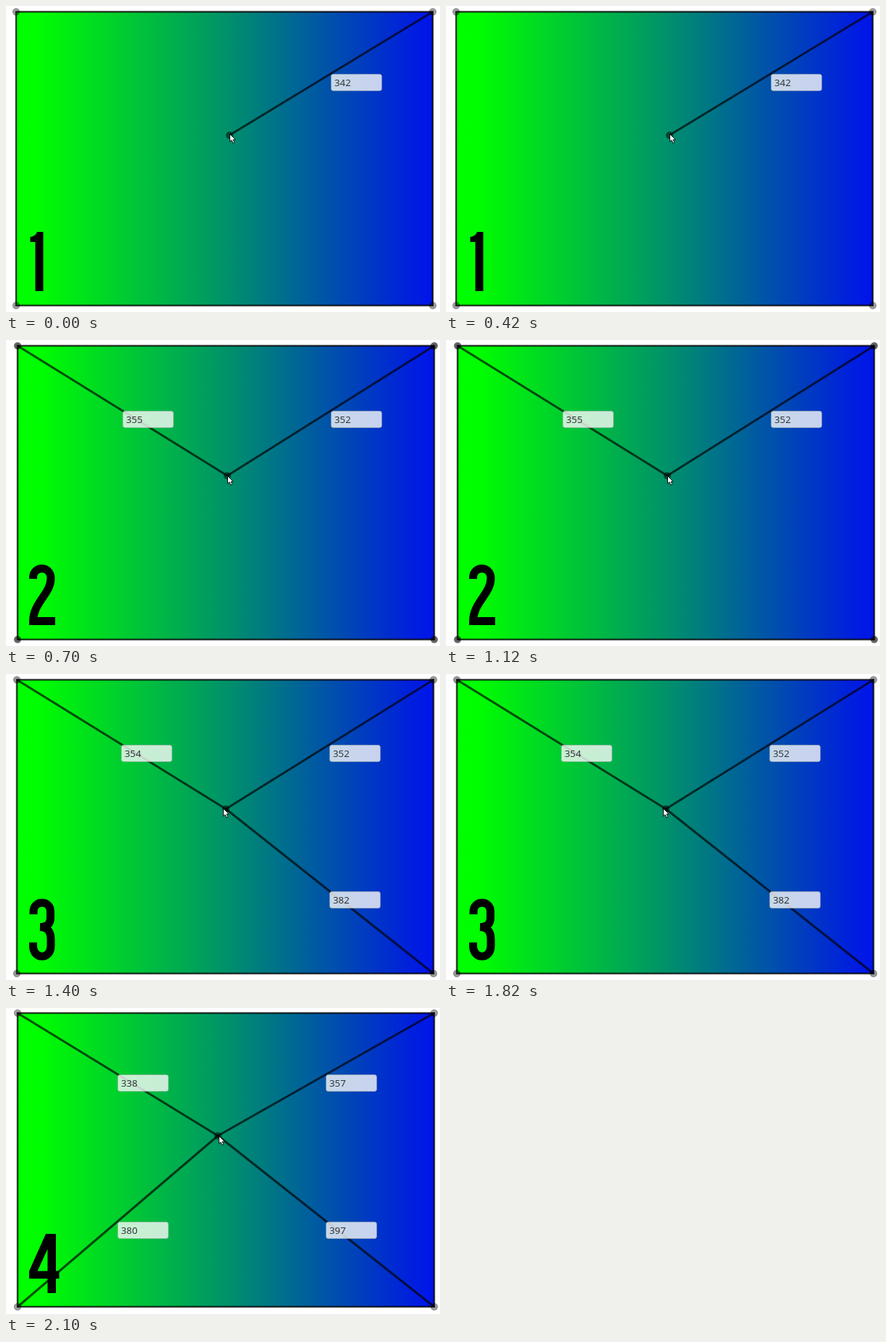
An HTML page with a canvas for the animation above (2.8 s loop, 600 by 424 pixels).

```html
<!DOCTYPE html>
<html lang="en">
<head>
<meta charset="utf-8">
<title>Spokes from a point to the corners</title>
<style>
  html, body { margin: 0; width: 100%; height: 100%; overflow: hidden; background: #fff; }
  canvas { display: block; width: 600px; height: 424px; }
</style>
</head>
<body>
<canvas id="stage" width="600" height="424"></canvas>
<script>
const ctx = document.getElementById('stage').getContext('2d');
const STEP = 700;
const WIDTH = 576, HEIGHT = 407;

// Spokes are ordered: top right, top left, bottom right, bottom left.
const scenes = [
  { origin: [14, 8], hub: [309, 179], tip: [309, 177], lengths: [342], node: 0.36 },
  { origin: [16, 8], hub: [306, 188], tip: [306, 188], lengths: [352, 355], node: 0.6 },
  { origin: [15, 8], hub: [304, 187], tip: [300, 186], lengths: [352, 354, 382], node: 0.38 },
  { origin: [16, 7], hub: [293, 177], tip: [294, 177], lengths: [357, 338, 397, 380], node: 0.36 }
];

const numerals = [
  { fill: 'M43 313H51.5V395H40.5V327H33.5V320Q41 319 43 313Z' },
  { stroke: 'M37.5 331V329C37.5 312.5 62 312.5 62 330C62 352 37.5 364 37.5 389.5H68' },
  { stroke: 'M38 333V329C38 313 61.5 313 61.5 329V338Q61.5 350.5 47 350.5M47 350.5Q62 351 62 367V377C62 396 37.5 396 37.5 377V372' },
  { fill: 'M55 313H69V364.5H73.5V375H69V395H57.5V375H32V364.5ZM57.5 334L43.5 364.5H57.5Z' }
].map(({ fill, stroke }) => ({ path: new Path2D(fill || stroke), filled: !!fill }));

const pointer = new Path2D('M0.5 0.5V11L3 8.8L4.8 13L6.8 12.1L5 8.1H8.3Z');

const shade = alpha => `rgba(0,0,0,${alpha})`;

function line(from, to) {
  ctx.beginPath();
  ctx.moveTo(...from);
  ctx.lineTo(...to);
  ctx.strokeStyle = shade(0.68);
  ctx.lineWidth = 3;
  ctx.stroke();
}

function dot([x, y], alpha) {
  ctx.beginPath();
  ctx.arc(x, y, 4.6, 0, Math.PI * 2);
  ctx.fillStyle = shade(alpha);
  ctx.fill();
  ctx.strokeStyle = shade(0.3);
  ctx.lineWidth = 1.3;
  ctx.stroke();
}

function label(text, x, y) {
  ctx.beginPath();
  ctx.roundRect(x + 0.5, y + 0.5, 70, 23, 3);
  ctx.fillStyle = 'rgba(250,250,250,0.8)';
  ctx.fill();
  ctx.strokeStyle = 'rgba(150,160,160,0.55)';
  ctx.lineWidth = 1;
  ctx.stroke();
  ctx.fillStyle = '#30383a';
  ctx.font = '13.33px "Noto Sans", "Open Sans", sans-serif';
  ctx.fillText(text, x + 5, y + 17);
}

function drawPlane([x, y]) {
  const gradient = ctx.createLinearGradient(x, 0, x + WIDTH, 0);
  gradient.addColorStop(0, 'rgb(0,255,0)');
  gradient.addColorStop(0.05, 'rgb(0,254,0)');
  gradient.addColorStop(0.5, 'rgb(0,146,105)');
  gradient.addColorStop(0.95, 'rgb(0,30,222)');
  gradient.addColorStop(1, 'rgb(0,20,235)');
  ctx.fillStyle = gradient;
  ctx.fillRect(x, y, WIDTH, HEIGHT);
  ctx.strokeStyle = shade(0.75);
  ctx.lineWidth = 2.5;
  ctx.strokeRect(x, y, WIDTH, HEIGHT);
}

function drawNumeral({ path, filled }) {
  ctx.fillStyle = ctx.strokeStyle = '#000';
  ctx.lineWidth = 11;
  if (filled) ctx.fill(path, 'evenodd');
  else ctx.stroke(path);
}

function drawPointer([x, y]) {
  ctx.save();
  ctx.translate(x, y);
  ctx.fillStyle = '#fff';
  ctx.strokeStyle = '#111';
  ctx.lineWidth = 1;
  ctx.fill(pointer);
  ctx.stroke(pointer);
  ctx.restore();
}

function draw(index) {
  const { origin, hub, tip, lengths, node } = scenes[index];
  const [left, top] = origin;
  const corners = [
    [left + WIDTH, top], [left, top],
    [left + WIDTH, top + HEIGHT], [left, top + HEIGHT]
  ];
  ctx.fillStyle = '#fff';
  ctx.fillRect(0, 0, 600, 424);
  drawPlane(origin);
  drawNumeral(numerals[index]);
  lengths.forEach((_, i) => line(hub, corners[i]));
  corners.forEach(corner => dot(corner, node));
  dot(hub, 0.5);
  lengths.forEach((length, i) => {
    const [x, y] = corners[i];
    label(length, Math.floor((x + hub[0]) / 2), Math.round((y + hub[1]) / 2));
  });
  drawPointer(tip);
}

const start = performance.now();
function tick() {
  const elapsed = Math.max(0, performance.now() - start);
  draw(Math.floor(elapsed / STEP) % scenes.length);
  requestAnimationFrame(tick);
}
tick();
</script>
</body>
</html>
```
